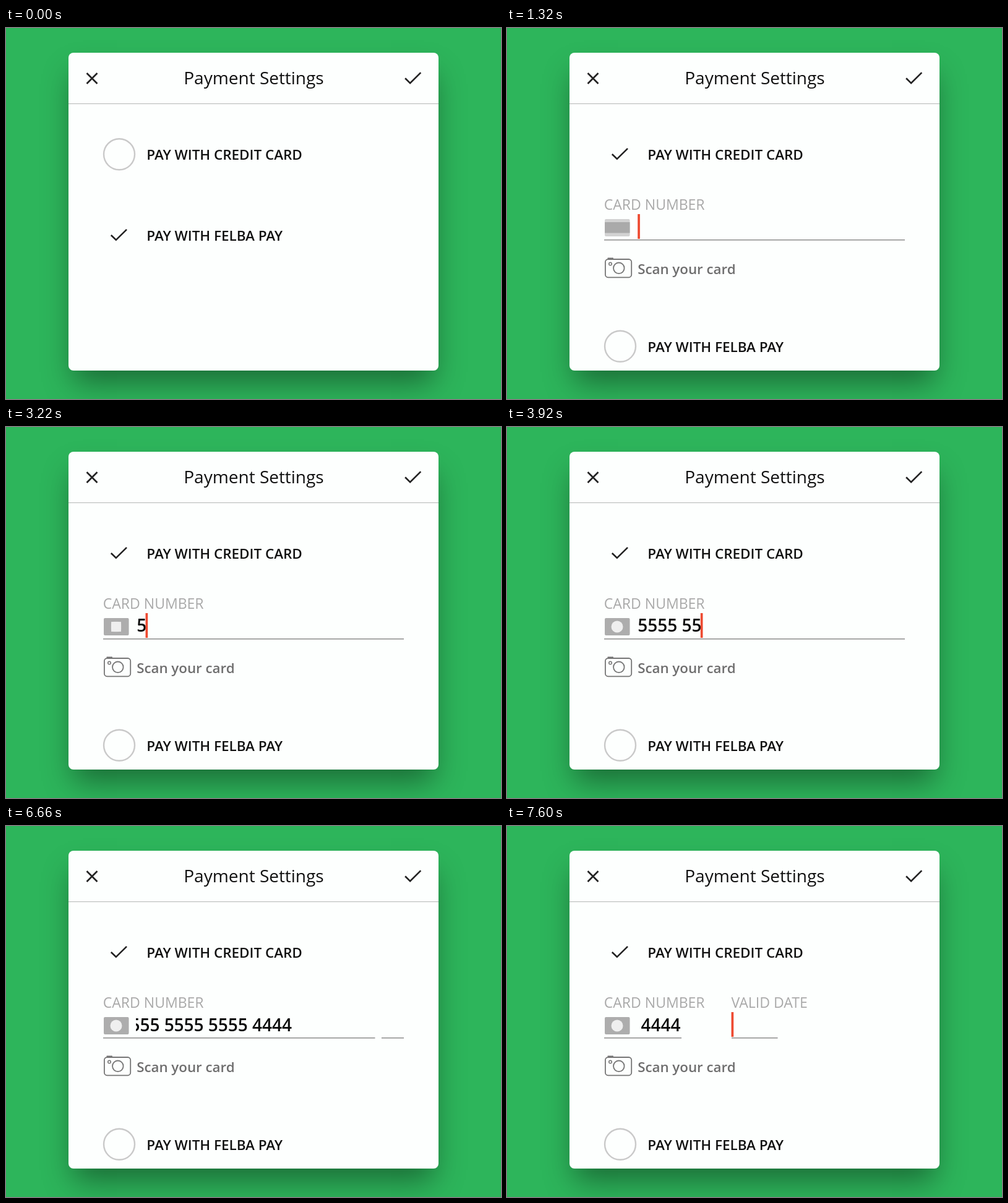
These frames come from a looping animation (800 by 600 pixels, 8000 ms). An HTML page:

```html
<!DOCTYPE html>
<html lang="en">
<head>
<meta charset="utf-8">
<title>Payment Settings</title>
<style>
  html, body { margin: 0; height: 100%; overflow: hidden; background: #2db55b; }
  .card {
    position: absolute; left: 101px; top: 40px; width: 598px; height: 514px;
    border-radius: 8px; background: #fdfffe;
    box-shadow: 0 27px 46px -8px rgba(0, 0, 0, .41);
  }
  svg { position: absolute; left: 0; top: 0; font-family: "Open Sans", sans-serif; }
  text { white-space: pre; }
  .option { font-size: 22.45px; font-weight: 600; fill: #111; }
  .label { font-size: 23px; fill: #a9a9a9; }
  .number { font-size: 28px; font-weight: 600; fill: #0c0c0c; }
  .stroke { fill: none; stroke: #222; stroke-width: 2.6; }
  .ring { fill: none; stroke: #c9c9c9; stroke-width: 2.4; }
  .rule { fill: #8c8c8c; }
  .camera { fill: none; stroke: #757575; stroke-width: 1.8; }
</style>
</head>
<body>
<div class="card"></div>
<svg width="800" height="600" viewBox="0 0 800 600">
  <defs>
    <clipPath id="numberClip"><rect x="210" y="298" width="433" height="43"/></clipPath>
    <clipPath id="fieldClip"><rect x="157" y="270" width="486" height="80"/></clipPath>
    <path id="check" d="M169.8 204 177.8 211.8 195 194.8"/>
  </defs>

  <path class="stroke" d="M130.5 73 147.5 90M147.5 73 130.5 90"/>
  <text x="400.5" y="90.5" font-size="28" text-anchor="middle" fill="#111">Payment Settings</text>
  <use href="#check" class="stroke" x="475.3" y="-122.7"/>
  <rect x="101" y="122" width="598" height="1" fill="#b5b7b6"/>

  <circle id="cardRing" class="ring" cx="183" cy="204.3" r="25"/>
  <use id="cardCheck" href="#check" class="stroke"/>
  <text class="option" x="227.3" y="213">PAY WITH CREDIT CARD</text>

  <g id="fields">
    <text class="label" x="156.8" y="294">CARD NUMBER</text>
    <g id="plainIcon">
      <rect x="158" y="309" width="40.5" height="28" rx="2" fill="#d2d2d2"/>
      <rect x="158" y="314" width="40.5" height="17.5" fill="#aaa"/>
    </g>
    <g id="squareIcon">
      <rect x="158" y="309" width="40.5" height="28" rx="2" fill="#adadad"/>
      <rect x="170" y="315" width="16" height="16" fill="#efefef"/>
    </g>
    <g id="roundIcon">
      <rect x="158" y="309" width="40.5" height="28" rx="2" fill="#adadad"/>
      <circle cx="178" cy="323" r="9.5" fill="#efefef"/>
    </g>
    <g clip-path="url(#numberClip)"><text id="number" class="number" x="211.3" y="331"></text></g>
    <rect id="numberRule" class="rule" x="157" y="342" height="1.5"/>
    <g clip-path="url(#fieldClip)">
      <g id="dateField">
        <rect class="rule" x="363" y="342" width="74.5" height="1.5"/>
        <text id="dateLabel" class="label" x="362.5" y="294">VALID DATE</text>
      </g>
    </g>
    <rect id="cursor" y="301" width="3.7" height="40" fill="#ee4a31"/>
    <g class="camera">
      <rect x="158.9" y="374" width="42.3" height="29.3" rx="4.5"/>
      <path d="M163.5 373.3V372.4H171V373.3"/>
      <circle cx="180.8" cy="388.3" r="8.8"/>
      <circle cx="167" cy="381.5" r="2.3" stroke-width="1.5"/>
    </g>
    <text x="211.2" y="397.5" font-size="22.3" font-weight="600" fill="#6e6e6e">Scan your card</text>
  </g>

  <g id="walletRow">
    <circle id="walletRing" class="ring" cx="183" cy="204.3" r="25"/>
    <use id="walletCheck" href="#check" class="stroke"/>
    <text class="option" x="227.3" y="213">PAY WITH FELBA PAY</text>
  </g>
</svg>
<script>
const LOOP = 8000, DIGITS = '5555555555554444';
const DIGIT_W = 16, SPACE_W = 7.28;
const KEY_TIMES = [3200, 3320, 3440, 3580, 3720, 3920, 4120, 4340,
                   4880, 5000, 5100, 5240, 6080, 6260, 6440, 6620];
// fade out from, to; fade in from, to
const BLINKS = [[1620, 1780, 2000, 2140], [5760, 5920, 6030, 6080], [7160, 7270, 7500, 7600]];

const el = id => document.getElementById(id);
const set = (id, name, value) => el(id).setAttribute(name, value);
const fade = (id, value) => set(id, 'opacity', value);
const mix = (a, b, p) => a + (b - a) * p;
const span = (t, a, b) => Math.min(1, Math.max(0, (t - a) / (b - a)));

function bezier(u, a, b) {
  return 3 * (1 - u) ** 2 * u * a + 3 * (1 - u) * u * u * b + u ** 3;
}

// The standard CSS "ease" curve
function ease(p) {
  let low = 0, high = 1;
  for (let i = 0; i < 20; i++) {
    const mid = (low + high) / 2;
    if (bezier(mid, .25, .25) < p) low = mid; else high = mid;
  }
  return bezier(low, .1, 1);
}

function typedText(t) {
  if (t >= 2300 && t < 3020) return '3';
  const count = KEY_TIMES.filter(k => t >= k).length;
  const text = DIGITS.slice(0, count).replace(/(.{4})/g, '$1 ');
  return count === 16 ? text.trimEnd() : text;
}

function textWidth(text) {
  return [...text].reduce((w, c) => w + (c === ' ' ? SPACE_W : DIGIT_W), 0);
}

function cursorAlpha(t) {
  if (t >= 6620 && t < 6960) return 0;
  return BLINKS.reduce((a, [o1, o2, i1, i2]) => a * (1 - span(t, o1, o2) + span(t, i1, i2)), 1);
}

function draw(t) {
  const open = ease(span(t, 560, 800));
  set('walletRow', 'transform', `translate(0 ${mix(131, 310.5, open)})`);
  fade('cardRing', 1 - open);
  fade('cardCheck', open);
  fade('walletRing', open);
  fade('walletCheck', 1 - open);
  fade('fields', open);

  const toSquare = span(t, 2480, 2720), toRound = span(t, 3200, 3440);
  fade('plainIcon', toSquare < 1 ? 1 : 0);
  fade('squareIcon', toRound < 1 ? toSquare : 0);
  fade('roundIcon', toRound);

  const text = typedText(t), slide = ease(span(t, 6620, 6960));
  el('number').textContent = text;
  set('number', 'transform', `translate(${-208.3 * slide} ${t >= 6620 ? 1 : 0})`);
  set('numberRule', 'width', mix(486, 125, slide));
  set('dateField', 'transform', `translate(${280 * (1 - slide)} 0)`);
  fade('dateLabel', span(t, 6700, 6940));

  set('cursor', 'x', t >= 6960 ? 362.5 : text ? 209.5 + textWidth(text) : 211.2);
  fade('cursor', cursorAlpha(t));
}

const start = performance.now();
function tick() {
  draw((performance.now() - start) % LOOP);
  requestAnimationFrame(tick);
}
tick();
</script>
</body>
</html>
```
